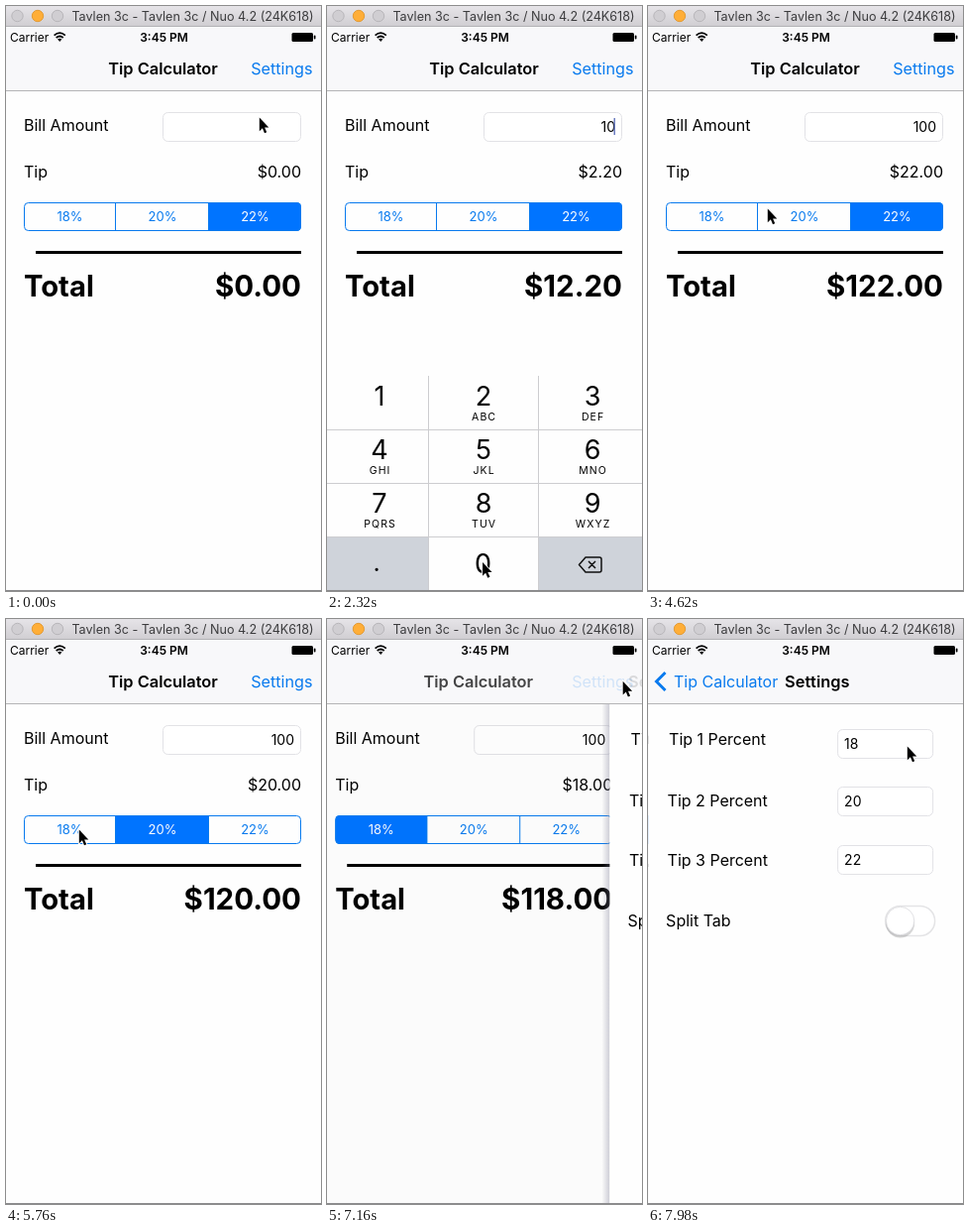
Animation, 318 px wide and 590 px high, one loop 8 s. Source, as an HTML page:

```html
<!DOCTYPE html>
<html lang="en">
<head>
<meta charset="utf-8">
<title>Tip Calculator</title>
<style>
  html, body { margin: 0; width: 100%; height: 100%; overflow: hidden; background: #fefefe; }
  svg { display: block; width: 318px; height: 590px; font-family: Inter, Roboto, sans-serif; user-select: none; }
  .blue { fill: #087aee; }
  .bold { font-weight: 600; }
  .heavy { font-weight: 700; }
  .field { fill: #fff; stroke: #e2e2e6; }
  .gray { fill: #cfd3da; }
</style>
</head>
<body>
<svg id="stage" viewBox="0 0 318 590"></svg>
<script>
const LOOP = 8000, WIDTH = 318, PAPER = '#fefefe', BLUE = '#087aee';
const SEGMENTS = [[18, 93, 18], [111, 94, 20], [205, 93, 22]];
const SHOW_KEYS = 330, HIDE_KEYS = 3720, PUSH = 7116;

// [time, x, y] of the pointer tip
const POINTER = [
  [0, 255, 112], [380, 254, 113], [1020, 96, 347], [1120, 90, 352], [1400, 55, 395], [1640, 55, 397],
  [2060, 156, 560], [2850, 157, 562], [3450, 162, 334], [3580, 162, 331], [4000, 161, 328],
  [4620, 120, 204], [4950, 146, 211], [5250, 147, 212], [5720, 73, 212], [6050, 73, 212],
  [6850, 297, 64], [7240, 298, 62], [7800, 264, 126], [7980, 261, 128]
];
// [time, bill, selected segment]
const STATES = [[0, '', 2], [1540, '1', 2], [2200, '10', 2], [2620, '100', 2], [5120, '100', 1], [5880, '100', 0]];
// [time, key index]
const TAPS = [[1450, 0], [2110, 10], [2530, 10]];

const text = (x, y, size, label, attrs = '') =>
  `<text x="${x}" y="${y}" font-size="${size}" ${attrs}>${label}</text>`;
const rect = (x, y, w, h, attrs = '') =>
  `<rect x="${x}" y="${y}" width="${w}" height="${h}" ${attrs}/>`;
const END = 'text-anchor="end"', MID = 'text-anchor="middle"';

function keypad() {
  const letters = ['', 'ABC', 'DEF', 'GHI', 'JKL', 'MNO', 'PQRS', 'TUV', 'WXYZ'];
  const edges = [0, 103, 213.5, 318], centers = [53, 158, 268];
  let out = rect(0, 373, WIDTH, 217, `fill="${PAPER}"`);
  for (let i = 0; i < 12; i++) {
    const col = i % 3, row = Math.floor(i / 3), x = centers[col], y = 373 + row * 54;
    const side = i === 9 || i === 11;
    out += rect(edges[col], y, edges[col + 1] - edges[col], 55, `class="key ${side ? 'gray' : ''}" ${side ? '' : `fill="${PAPER}"`}`);
    if (i < 9) {
      out += text(x, y + 30, 27, i + 1, MID);
      out += text(x + .6, y + 45, 10.5, letters[i], MID + ' letter-spacing="1.1"');
    }
  }
  return out + text(157.5, 572, 27, '0', MID) + text(50, 570, 25, '.', MID) +
    `<path d="M0 427.5H318M0 481.5H318M0 535.5H318M102.5 373V590M213.5 373V590" stroke="#cdcdd0" fill="none"/>
     <path d="M254.5 563.5L261 556H275Q277 556 277 558V569Q277 571 275 571H261ZM264 560L271 567M271 560L264 567" fill="none" stroke="#111" stroke-width="1.5" stroke-linejoin="round"/>`;
}

function calculator() {
  return rect(0, 85, WIDTH, 505, `fill="${PAPER}"`) +
    text(18, 126, 16, 'Bill Amount') + rect(158.5, 107.5, 139, 29, 'rx="5" class="field"') +
    text(291, 126.5, 14, '', END + ' id="bill"') +
    rect(289.5, 113, 1.5, 17, 'id="caret" fill="#6b7cc0"') +
    text(18, 173, 16, 'Tip') + text(298, 173, 16, '', END + ' id="tip"') +
    `<g clip-path="url(#round)">${rect(18, 198, 93, 29, 'id="chosen" fill="#0074ff"')}</g>` +
    rect(18.5, 198.5, 279, 28, `rx="4" fill="none" stroke="${BLUE}"`) +
    `<path d="M110.5 198V227M204.5 198V227" stroke="${BLUE}"/>` +
    SEGMENTS.map(([x, w, rate]) => text(x + w / 2, 217.3, 13, rate + '%', MID + ' class="segment"')).join('') +
    rect(30, 247, 268, 3) +
    text(18, 293, 29.2, 'Total', 'class="heavy"') +
    text(298, 293, 29.5, '', END + ' class="heavy" id="total"');
}

function settings() {
  const rows = [[21, 127, 111.5], [19.5, 189, 169.5], [19.5, 248.5, 228.5]];
  return rect(-8, 85, 8, 505, 'fill="url(#edge)"') + rect(0, 85, WIDTH, 505, `fill="${PAPER}"`) +
    rows.map(([x, y, top], i) =>
      text(x, y, 16, `Tip ${i + 1} Percent`) + rect(191.5, top, 96, 29, 'rx="5" class="field"') +
      text(198, top + 19.5, 14, SEGMENTS[i][2])).join('') +
    text(18, 310, 16, 'Split Tab') +
    rect(239.5, 289.5, 50, 30, 'rx="15" fill="#fff" stroke="#e4e4e6" stroke-width="1.5"') +
    `<circle cx="254.5" cy="307" r="14.5" fill="#777" opacity=".3"/>
     <circle cx="254.5" cy="304.5" r="14.2" fill="#fff" stroke="#d5d5d8" stroke-width=".7"/>`;
}

function bars() {
  return rect(0, 20, WIDTH, 65, 'fill="#f8f8fa"') + rect(0, 85, WIDTH, 1, 'fill="#b4b4b6"') +
    text(158.5, 69, 16.4, 'Tip Calculator', MID + ' class="bold" id="heading"') +
    text(309.5, 69, 16.2, 'Settings', END + ' class="blue" id="open"') +
    text(138, 69, 16.4, 'Settings', 'class="bold" id="nextHeading"') +
    text(26, 69, 16, 'Tip Calculator', 'class="blue" id="back"') +
    `<path id="chevron" d="M17.5 54L8.5 63L17.5 72" fill="none" stroke="${BLUE}" stroke-width="3"/>` +
    text(4, 35.5, 12, 'Carrier') + text(159.5, 35.5, 12, '3:45 PM', MID + ' class="bold"') +
    `<path d="M48.6 29.6Q54.2 24.7 59.8 29.6M50.7 32Q54.2 28.9 57.7 32" fill="none" stroke="#000" stroke-width="1.8"/>
     <path d="M52.1 33.6Q54.2 32 56.3 33.6L54.2 36Z"/>` +
    rect(288.5, 27, 21.5, 9, 'rx="1.5"') + rect(310.8, 29.5, 1.7, 4, 'rx="1"') +
    rect(0, 0, WIDTH, 20.5, 'fill="url(#window)"') + rect(0, 20, WIDTH, 1, 'fill="#b3b2b6"') +
    [[11.5, '#d0ced2', '#b8b6ba'], [32, '#ffae38', '#e39b34'], [52, '#d0ced2', '#b8b6ba']].map(([x, fill, line]) =>
      `<circle cx="${x}" cy="10" r="5.7" fill="${fill}" stroke="${line}"/>`).join('') +
    text(188.5, 14.7, 12.6, 'Tavlen 3c - Tavlen 3c / Nuo 4.2 (24K618)', MID + ' fill="#3c3c3e"');
}

const stage = document.getElementById('stage');
stage.innerHTML = `
  <defs>
    <linearGradient id="window" x2="0" y2="1"><stop stop-color="#e6e4e8"/><stop offset="1" stop-color="#d0ced2"/></linearGradient>
    <linearGradient id="edge"><stop stop-color="#777790" stop-opacity="0"/><stop offset="1" stop-color="#777790" stop-opacity=".35"/></linearGradient>
    <clipPath id="round">${rect(18, 198, 280, 29, 'rx="4.5"')}</clipPath>
  </defs>
  ${rect(0, 0, WIDTH, 590, `fill="${PAPER}"`)}
  <g id="calculator">${calculator()}</g>
  <g id="keypad">${keypad()}</g>
  ${rect(0, 85, WIDTH, 505, 'id="dim" fill="#000"')}
  <g id="settings">${settings()}</g>
  ${bars()}
  ${rect(0, 589, WIDTH, 1, 'fill="#8b8b8d"')}
  <g id="pointer"><path d="M.8 .5V14.2L3.9 11.3L6 16.2L8.2 15.3L6.1 10.5H10.3Z" stroke="#fff" stroke-width="1.8" paint-order="stroke"/></g>`;

const parts = {};
stage.querySelectorAll('[id]').forEach(el => parts[el.id] = el);
const keys = [...stage.querySelectorAll('.key')];
const segments = [...stage.querySelectorAll('.segment')];

const clamp = v => Math.max(0, Math.min(1, v));
const smooth = v => v * v * (3 - 2 * v);
const spring = (ms, rate) => { const s = Math.max(0, ms) / 1000 * rate; return 1 - (1 + s) * Math.exp(-s); };
const shift = (el, x, y = 0) => el.setAttribute('transform', `translate(${x.toFixed(2)} ${y.toFixed(2)})`);
const fade = (el, value) => el.setAttribute('opacity', clamp(value).toFixed(3));
const money = value => '$' + value.toFixed(2);

function pointerAt(t) {
  const next = POINTER.findIndex(p => p[0] > t);
  if (next < 0) return POINTER[POINTER.length - 1].slice(1);
  const a = POINTER[next - 1], b = POINTER[next], k = smooth((t - a[0]) / (b[0] - a[0]));
  return [a[1] + (b[1] - a[1]) * k, a[2] + (b[2] - a[2]) * k];
}

function draw(t) {
  const [changed, bill, pick] = STATES.filter(s => s[0] <= t).pop();
  const amount = Number(bill), tip = amount * SEGMENTS[pick][2] / 100;
  parts.bill.textContent = bill;
  parts.tip.textContent = money(tip);
  parts.total.textContent = money(amount + tip);
  parts.chosen.setAttribute('x', SEGMENTS[pick][0]);
  parts.chosen.setAttribute('width', SEGMENTS[pick][1]);
  segments.forEach((el, i) => el.setAttribute('fill', i === pick ? PAPER : BLUE));

  // each edit restarts the caret's blink
  const editing = t >= SHOW_KEYS && t < HIDE_KEYS;
  const blink = (t - Math.max(SHOW_KEYS, changed)) / 1000 % 1;
  fade(parts.caret, editing ? (.85 - blink) / .25 : 0);

  const raised = t < HIDE_KEYS ? spring(t - SHOW_KEYS, 16) : 1 - spring(t - HIDE_KEYS, 16);
  shift(parts.keypad, 0, 218 * (1 - raised));
  parts.keypad.style.display = raised < .002 ? 'none' : '';
  keys.forEach((el, i) => {
    const down = TAPS.some(([at, key]) => key === i && t >= at && t < at + 130);
    if (i !== 9 && i !== 11) el.classList.toggle('gray', down);
  });

  const p = spring(t - PUSH, 12);
  shift(parts.calculator, -WIDTH * .3 * p);
  shift(parts.settings, WIDTH * (1 - p));
  parts.settings.style.display = p ? '' : 'none';
  fade(parts.dim, p * .1);
  shift(parts.heading, -56 * p);
  fade(parts.heading, 1 - p * 2.7);
  fade(parts.open, t < 7030 ? 1 : .2 * (1 - p * 2));
  shift(parts.nextHeading, 185 * (1 - p));
  fade(parts.nextHeading, p * 1.2);
  shift(parts.back, 77 * (1 - p));
  fade(parts.back, (p - .15) * 1.5);
  fade(parts.chevron, (p - .15) * 1.5);
  shift(parts.pointer, ...pointerAt(t));
}

const start = performance.now();
function tick() {
  draw((performance.now() - start) % LOOP);
  requestAnimationFrame(tick);
}
tick();
</script>
</body>
</html>
```
